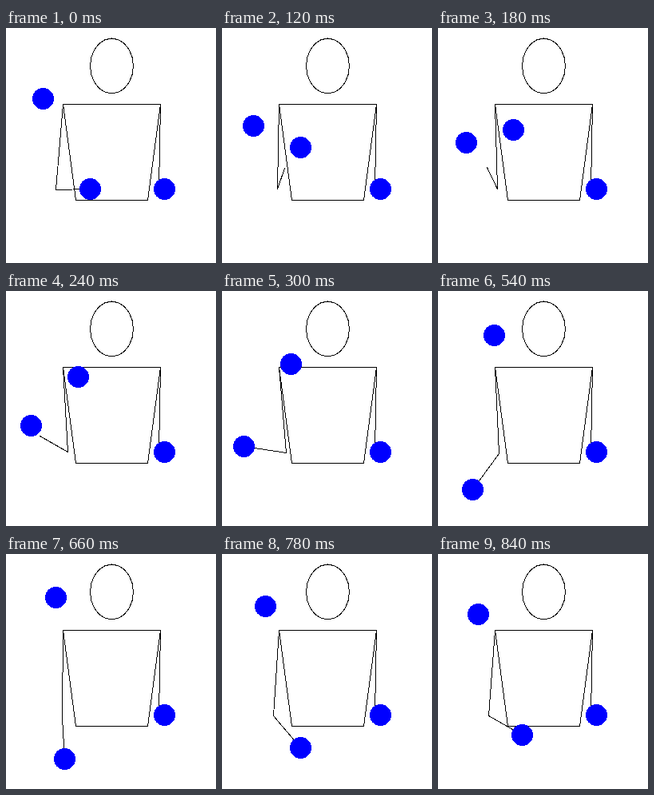
These frames come from a looping animation (263 by 294 pixels, 0.9 s). An HTML page:

```html
<!DOCTYPE html>
<html lang="en">
<head>
<meta charset="utf-8">
<title>Juggler</title>
<style>
  html, body { margin: 0; width: 100%; height: 100%; overflow: hidden; background: #fff; }
  svg { display: block; width: 263px; height: 294px; }
  .lines { fill: none; stroke: #000; }
  .balls { fill: #00f; }
</style>
</head>
<body>
<svg viewBox="0 0 263 294" shape-rendering="crispEdges">
  <g class="lines">
    <polygon id="head"/>
    <polygon points="71.5,95.5 193.5,95.5 177.5,215.5 87.5,215.5"/>
    <path d="M193.5 95.5L191.5 201.5"/>
    <polyline id="arm"/>
  </g>
  <g class="balls">
    <circle r="13.5" cx="198.5" cy="201.5"/>
    <circle r="13.5" id="rising"/>
    <circle r="13.5" id="falling"/>
  </g>
</svg>
<script>
const STEP = 60, COUNT = 15, CATCH = 5;
const $ = id => document.getElementById(id);
const snap = v => Math.floor(v) + 0.5;

// Key poses of the throwing arm: step, hand x, hand y, elbow x, elbow y
const keys = [
  [0, 105, 201, 62, 202],
  [3, 61, 174, 74, 201],
  [5, 27, 194, 80, 202],
  [7, 23, 226, 78, 203],
  [9, 43, 248, 76, 203],
  [11, 73, 256, 70, 205],
  [14, 105, 226, 63, 202]
];

function key(n) {
  const len = keys.length, lap = Math.floor(n / len);
  const [step, ...pose] = keys[n - lap * len];
  return [step + lap * COUNT, ...pose];
}

// Slope at a key of the parabola through it and its neighbours
function slope(n, c) {
  const a = key(n - 1), b = key(n), d = key(n + 1);
  const before = b[0] - a[0], after = d[0] - b[0];
  return ((b[c] - a[c]) / before * after + (d[c] - b[c]) / after * before) / (before + after);
}

// Closed cubic spline through the key poses
function armPose(i) {
  const n = keys.findLastIndex(k => k[0] <= i);
  const a = key(n), b = key(n + 1), span = b[0] - a[0], u = (i - a[0]) / span;
  return [1, 2, 3, 4].map(c => snap(
    a[c] + (b[c] - a[c]) * u * u * (3 - 2 * u) +
    span * u * (1 - u) * (slope(n, c) * (1 - u) - slope(n + 1, c) * u)
  ));
}

const flight = age => [snap(106 - 3.94 * age), snap(53.4 + 1.455 * (age - 10.12) ** 2)];

function place(id, [x, y]) {
  $(id).setAttribute("cx", x);
  $(id).setAttribute("cy", y);
}

function draw(i) {
  const [hx, hy, ex, ey] = armPose(i), hand = [hx, hy];
  $("arm").setAttribute("points", `71.5,95.5 ${ex},${ey} ${hx},${hy}`);
  place("rising", i ? flight(i) : hand);
  place("falling", i < CATCH ? flight(i + COUNT) : hand);
}

$("head").setAttribute("points", Array.from({ length: 20 }, (_, k) => {
  const a = k * Math.PI / 10;
  return [132.5 + 27 * Math.cos(a), 47.5 + 34.5 * Math.sin(a)];
}).join(" "));

const start = performance.now();
function tick() {
  draw(Math.floor((performance.now() - start) / STEP) % COUNT);
  requestAnimationFrame(tick);
}
tick();
</script>
</body>
</html>
```
